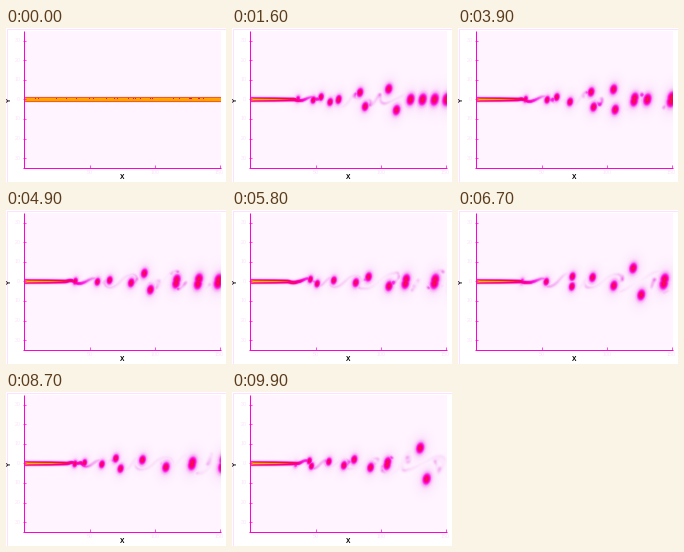
Write a matplotlib script that moves like this. It is 220 px wide and 154 px high and loops after 10 s.

```python
import numpy as np
import matplotlib.pyplot as plt
from matplotlib.animation import FuncAnimation
from matplotlib.colors import LinearSegmentedColormap

W, H = 220, 154
LEFT, RIGHT, TOP, BOTTOM = 18, 215, 3, 139
MID = 71.5
DRIFT = 3.6    # pixels per frame
FRAMES = 100
STEP = .1      # spacing of the markers that carry the shear layer
BLUR = 1.45
MAGENTA, PALE = "#ff00d8", "#fbe2fb"

CMAP = LinearSegmentedColormap.from_list("vorticity", [
    (0, "#fff4ff"), (.1, "#fbe0fb"), (.25, "#f5a8f2"), (.4, "#fa30ec"),
    (.52, "#ff00b4"), (.66, "#f80060"), (.76, "#f02030"),
    (.87, "#ff9c00"), (1, "#ffd800")], N=512)

# Vortex pairs: place at time zero, and the x where the two roll round each other.
PAIRS = [(x, 60) for x in range(121, 240, 12)] + [
    (103, 161), (73, 131), (49, 60), (36, 120), (16, 150), (-6, 130),
    (-35, 142), (-62, 178), (-96, 180), (-127, 105), (-165, 188),
    (-201, 115), (-226, 160), (-252, 150), (-278, 80), (-296, 100)]
START, PAIRING = np.array(PAIRS, float).T

xs = np.arange(LEFT, RIGHT) + .5
ys = np.arange(TOP, BOTTOM) + .5


def smooth(v):
    v = np.clip(v, 0, 1)
    return v * v * (3 - 2 * v)


def vortices(k):
    """Centres and strengths; partners orbit clockwise, then merge."""
    x = START + DRIFT * k
    turn = np.radians(np.minimum(65 * np.exp((x - PAIRING) / 25), 105))
    gap = PAIRING ** 2 / 2200 * (1 - .75 * smooth((x - PAIRING - 8) / 22))
    dx = .75 * gap * np.cos(turn)
    dy = gap * np.sin(turn) * smooth(k / 14)
    vx = np.concatenate([x - dx, x + dx])
    vy = np.concatenate([MID - dy, MID + dy])
    amp = smooth((vx - 54) / 16) * smooth(k / 8)
    near = (amp > .01) & (vx < RIGHT + 45)
    return vx[near], vy[near], amp[near]


def velocity(px, py, k):
    u, v = np.zeros_like(px), np.zeros_like(px)
    for x, y, amp in zip(*vortices(k)):
        dx, dy = px - x, py - y
        r2 = dx ** 2 + dy ** 2
        spin = 6 * amp * np.exp(-r2 / 400) / (r2 + 18)
        u -= spin * dy
        v += spin * dx
    # keep the layer centred on average
    n = int(28 / STEP)
    v -= np.convolve(v, np.ones(n) / n, "same")
    return u + DRIFT, v


def blur_matrix(n):
    i = np.arange(n)
    return np.exp(-((i[:, None] - i) / BLUR) ** 2 / 2) / (BLUR * np.sqrt(2 * np.pi))


BLUR_X, BLUR_Y = blur_matrix(len(xs)), blur_matrix(len(ys))


def layer(px, py, k):
    """Blurred density of the markers, thinning downstream."""
    thin = np.interp(px, [18, 40, 60, 95, 220], [1.2, 1.1, .85, .36, .26])
    old = smooth(k / 12)
    mass = STEP * (1 + old * (thin - 1))
    hist, _, _ = np.histogram2d(py, px, weights=mass,
                                bins=[np.arange(TOP, BOTTOM + 1), np.arange(LEFT, RIGHT + 1)])
    hist[:, 0] *= 1.8   # no neighbours beyond the inlet
    f = BLUR_Y @ hist @ BLUR_X * BLUR * np.sqrt(2 * np.pi)
    cap = np.interp(xs, [55, 80], [1.3, .6])
    return cap * np.tanh(f / cap)


def core(x, y, amp):
    w = 1.8 + .009 * (x - 60)
    dy = ys[:, None] - y
    dx = xs[None] - x + .12 * dy
    g = np.exp(-(dx / w) ** 2 / 2 - (dy / (1.4 * w)) ** 2 / 2)
    return amp * (.6 * g + .12 * g ** .25)


def band(k):
    """The undisturbed layer, dissolving as it rolls up."""
    f = .89 * np.exp(-((ys - MID) / 2.7) ** 8)[:, None] * np.ones(len(xs))
    if k == 0:
        specks = np.random.default_rng(4).choice(len(xs), 24, replace=False)
        f[70 - TOP, specks] = .68
    return f * (1 - smooth(k / 7))


def simulate():
    px = np.arange(-345, 240, STEP)
    py = np.full_like(px, MID)
    fields = []
    for k in range(FRAMES):
        f = np.maximum(layer(px, py, k) * smooth(k / 2), band(k))
        for v in zip(*vortices(k)):
            f = np.maximum(f, core(*v))
        fields.append(f)
        u, v = velocity(px, py, k)
        u, v = velocity(px + u / 2, py + v / 2, k + .5)
        px, py = px + u, py + v
    return fields


def rule(x, y, color=MAGENTA, width=.72):
    ax.plot(x, y, color=color, lw=width, zorder=3, solid_capstyle="butt")


def label(x, y, text, size=3.8, color=PALE, **kw):
    ax.text(x, y, text, fontsize=size, color=color, ha="center", va="center",
            family="Liberation Sans", **kw)


fields = simulate()
fig = plt.figure(figsize=(W / 100, H / 100), dpi=100, facecolor="white")
ax = fig.add_axes([0, 0, 1, 1])
ax.axis("off")
image = ax.imshow(fields[0], cmap=CMAP, vmin=0, vmax=1, interpolation="nearest",
                  extent=(LEFT, RIGHT, BOTTOM, TOP), aspect="auto", zorder=1)
ax.set_xlim(0, W)
ax.set_ylim(H, 0)

rule([.5, W - .5, W - .5, .5, .5], [.5, .5, H - .5, H - .5, .5], "#ffe0ff")
rule([17.5, 17.5], [TOP, BOTTOM + 1])
rule([17, RIGHT], [139.5, 139.5])
for i in range(7):
    y = 12.5 + 19.6 * i
    rule([17, 20], [y, y], width=.5)
    label(12, y, str(abs(30 - 10 * i)))
for i in range(1, 4):
    x = 18.5 + 65.3 * i
    rule([x, x], [137, 140], width=.5)
    label(min(x, 213), 145, str(50 * i))
label(116.5, 149.5, "X", 4.8, "black", weight="bold")
label(3.5, 71.5, "Y", 4.4, "black", weight="bold", rotation=90)


def update(k):
    image.set_data(fields[k])
    return image,


anim = FuncAnimation(fig, update, frames=FRAMES, interval=100, repeat=True,
                     repeat_delay=0, blit=False)
plt.show()
```
